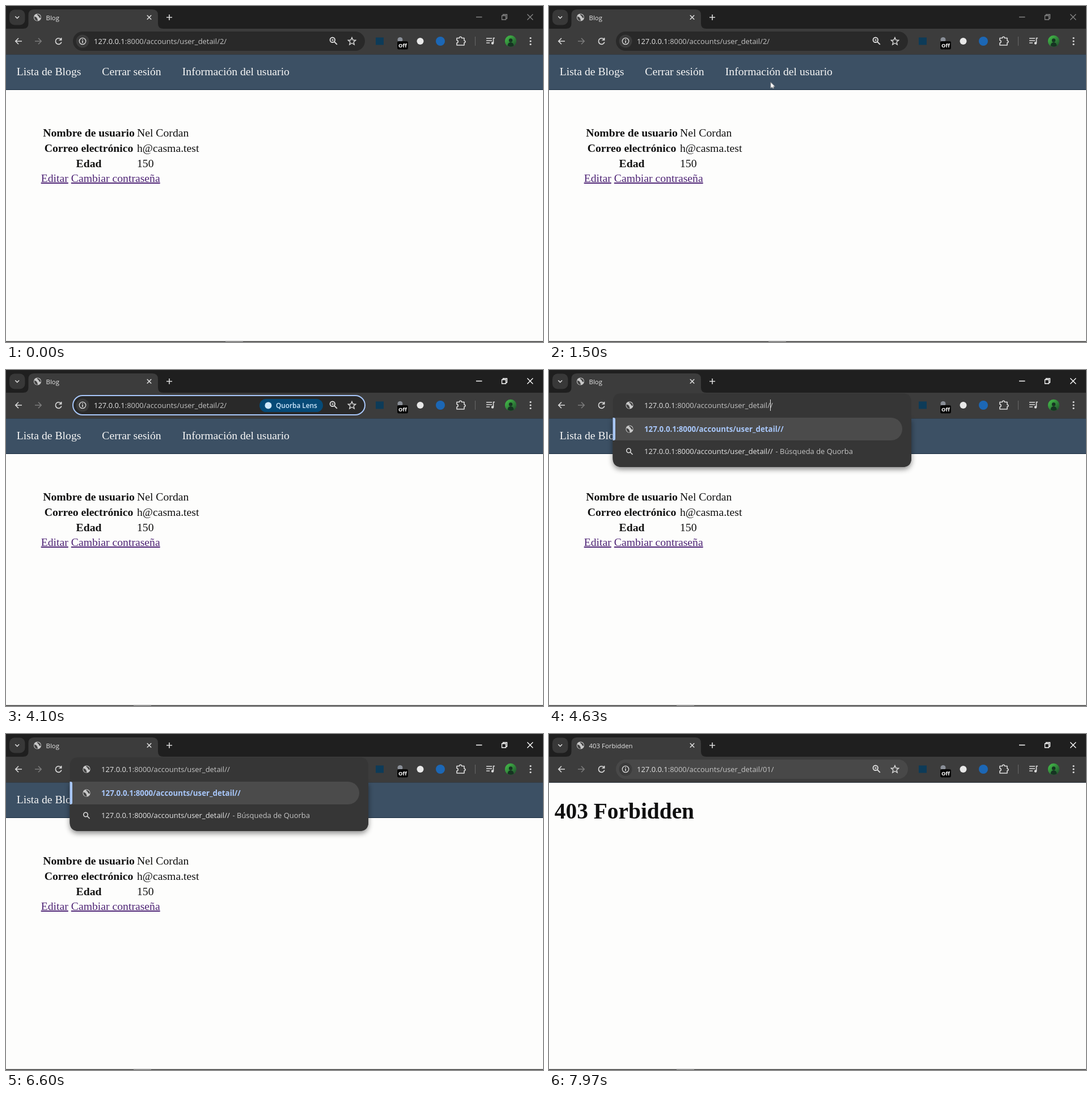
Write an HTML page that moves like this. It is 947x592 px and loops after 8000 ms.

```html
<!DOCTYPE html>
<html lang="es">
<head>
<meta charset="utf-8">
<title>Blog</title>
<style>
html, body { margin: 0; width: 100%; height: 100%; overflow: hidden; background: #fdfdfc; }
svg { display: block; width: 100%; height: 100%; }
text { font: 12.95px "Open Sans", "Noto Sans", sans-serif; fill: #e6e6e6; white-space: pre; }
.page text { font: 19.7px "Liberation Serif", "Times New Roman", serif; fill: #101010; }
.page .nav { fill: #f6f6f6; }
.page .th { font-weight: 700; text-anchor: middle; }
.page .link { fill: #4f2576; text-decoration: underline; }
.page .h1 { font-size: 39.4px; font-weight: 700; }
.tab { font-size: 11.4px; }
.chip { font-size: 11.8px; font-weight: 600; fill: #cfe9ff; }
.badge { font-size: 9.5px; font-weight: 700; fill: #fff; }
.path { fill: #c4c4c4; }
.match { font-size: 13.3px; font-weight: 700; fill: #a8c7fa; }
.line { fill: none; stroke: #dcdcdc; stroke-width: 1.6; }
.caret { stroke: #e6e6e6; stroke-width: 1; }

/* 8 s clock: every state switches in hard steps */
.win, .pill, .task, .early, .focus, .late, .popup, .q0, .q1, .q2, .blinkA, .blinkB, .blog, .denied {
  animation: 8s step-end infinite;
}
.win { animation-name: win; }
.pill { animation-name: pill; }
.task { animation-name: task; }
.early { animation-name: early; }
.focus { animation-name: focus; }
.late { animation-name: late; }
.popup { animation-name: popup; }
.q0 { animation-name: q0; }
.q1 { animation-name: q1; }
.q2 { animation-name: q2; }
.blinkA { animation-name: blinkA; }
.blinkB { animation-name: blinkB; }
.blog { animation-name: blog; }
.denied { animation-name: denied; }
.mouse { animation: mouse 8s linear infinite; }

@keyframes win { 0% { stroke: #858585; } 24.875%, 100% { stroke: #fff; } }
@keyframes pill { 0% { fill: #292929; } 88.125%, 100% { fill: #484848; } }
@keyframes task { 0% { transform: translateX(387px); } 24.875%, 100% { transform: translateX(225px); } }
@keyframes early { 0% { opacity: 1; } 56.25%, 100% { opacity: 0; } }
@keyframes focus { 0% { opacity: 0; } 24.875% { opacity: 1; } 56.25%, 100% { opacity: 0; } }
@keyframes late { 0% { opacity: 0; } 88.125%, 100% { opacity: 1; } }
@keyframes popup { 0% { opacity: 0; } 56.25% { opacity: 1; } 88.125%, 100% { opacity: 0; } }
@keyframes q0 { 0% { opacity: 1; } 83.75%, 100% { opacity: 0; } }
@keyframes q1 { 0% { opacity: 0; } 83.75% { opacity: 1; } 86%, 100% { opacity: 0; } }
@keyframes q2 { 0% { opacity: 0; } 86%, 100% { opacity: 1; } }
@keyframes blinkA {
  0% { opacity: 0; } 25.625% { opacity: 1; } 32.25% { opacity: 0; }
  38.875% { opacity: 1; } 45.5% { opacity: 0; } 52.125% { opacity: 1; } 56.25%, 100% { opacity: 0; }
}
@keyframes blinkB {
  0% { opacity: 0; } 56.25% { opacity: 1; } 62.875% { opacity: 0; }
  69.5% { opacity: 1; } 76.125% { opacity: 0; } 82.75%, 100% { opacity: 1; }
}
@keyframes blog { 0% { opacity: 1; } 91.25%, 100% { opacity: 0; } }
@keyframes denied { 0% { opacity: 0; } 91.25%, 100% { opacity: 1; } }
@keyframes mouse {
  0%, 10.8% { transform: translate(432px, 600px); }
  13.2%, 14% { transform: translate(413.5px, 275.5px); }
  18% { transform: translate(394px, 150px); opacity: 1; }
  21.2% { transform: translate(379px, 82px); opacity: 1; }
  21.3%, 100% { transform: translate(379px, 82px); opacity: 0; }
}
</style>
</head>
<body>
<svg viewBox="0 0 947 592" preserveAspectRatio="none">
  <defs>
    <g id="globe">
      <circle r="6.6" fill="#c8c8c8"/>
      <path d="M-5.5-1.5C-3-1-1 0-.5 2S1 4 0 6C-4 6-6 2-5.500-1.500ZM-1-5.500C0-3 2-3 2.500-1S5 1 5.800 1C6-3 3-5.500-1-5.500Z" fill="#424242"/>
    </g>
    <g id="glass" class="line">
      <circle cx="-1.500" cy="-1.500" r="3.700"/>
      <path d="M1.300 1.300 5.500 5.500"/>
    </g>
    <linearGradient id="photo" x2="1" y2="1">
      <stop offset=".2" stop-color="#3fae45"/>
      <stop offset="1" stop-color="#1d4a2a"/>
    </linearGradient>
    <filter id="soft" x="-10%" y="-20%" width="120%" height="150%">
      <feDropShadow dx="0" dy="4" stdDeviation="5" flood-opacity=".45"/>
    </filter>
  </defs>

  <!-- page -->
  <rect width="947" height="592" fill="#fdfdfc"/>
  <g class="page blog">
    <rect y="85" width="947" height="63" fill="#3c5064"/>
    <rect y="147" width="947" height="1" fill="#15293d"/>
    <text class="nav" x="18.700" y="122">Lista de Blogs</text>
    <text class="nav" x="169.300" y="122">Cerrar sesión</text>
    <text class="nav" x="310.800" y="122">Información del usuario</text>
    <text class="th" x="146" y="230">Nombre de usuario</text>
    <text x="231" y="230">Nel Cordan</text>
    <text class="th" x="146" y="257">Correo electrónico</text>
    <text x="231" y="257">h@casma.test</text>
    <text class="th" x="146" y="284">Edad</text>
    <text x="231" y="284">150</text>
    <text class="link" x="61.700" y="310">Editar</text>
    <text class="link" x="114.800" y="310">Cambiar contraseña</text>
  </g>
  <g class="page denied">
    <text class="h1" x="9.800" y="148.500">403 Forbidden</text>
  </g>

  <!-- tab strip -->
  <rect width="947" height="41" fill="#1f1f1f"/>
  <rect x="6" y="6.500" width="27.500" height="27" rx="9" fill="#383838"/>
  <path class="line" d="M16.300 18.300 19.700 21.700 23.100 18.300"/>
  <path d="M30 40Q39.500 40 39.500 31V16Q39.500 6 49.500 6H258Q268 6 268 16V31Q268 40 277.500 40Z" fill="#3c3c3c"/>
  <use href="#globe" x="55.500" y="20"/>
  <text class="tab blog" x="70.500" y="24.700">Blog</text>
  <text class="tab denied" x="70.500" y="24.700">403 Forbidden</text>
  <path class="line" d="M248.800 16.300 256.200 23.700M256.200 16.300 248.800 23.700M283 20H293M288 15V25"/>
  <g class="win" fill="none" stroke-width="1.300">
    <path d="M829 19.500H839.500M919.300 14.500 929.300 24.500M929.300 14.500 919.300 24.500"/>
    <path d="M874.500 17H881.500V24H874.500ZM876.500 17V15H883.500V22H881.500"/>
  </g>

  <!-- toolbar -->
  <rect y="40" width="947" height="45" fill="#3c3c3c"/>
  <rect y="85" width="947" height="1" fill="#333d46"/>
  <path class="line" d="M28 62H17M22 56.800 16.800 62 22 67.200"/>
  <path class="line" style="stroke:#7b7b7b" d="M51 62H62M57 56.800 62.200 62 57 67.200"/>
  <path class="line" d="M97 59A5.300 5.300 0 1 0 97.800 63.500M97.600 56V60H93.500"/>
  <rect class="pill" x="118" y="45" width="515" height="34" rx="17"/>
  <circle cx="135" cy="62" r="11.500" fill="#3b3b3b"/>
  <circle class="line" cx="135" cy="62" r="5.700" style="stroke-width:1.300"/>
  <path class="line" d="M135 61V65.300M135 58.600V60"/>
  <g class="early">
    <text x="155" y="66.700">127.0.0.1<tspan class="path">:8000/accounts/user_detail/2/</tspan></text>
  </g>
  <g class="late">
    <text x="155" y="66.700">127.0.0.1<tspan class="path">:8000/accounts/user_detail/01/</tspan></text>
  </g>
  <g class="focus">
    <rect x="118" y="45" width="515" height="34" rx="17" fill="none" stroke="#a8c7fa" stroke-width="2"/>
    <rect x="447" y="51" width="112" height="23" rx="11.500" fill="#064a77"/>
    <circle cx="462.500" cy="62.500" r="6" fill="#cfe9ff"/>
    <text class="chip" x="476" y="66.700">Quorba Lens</text>
  </g>
  <path class="caret blinkA" d="M377.500 51V71"/>
  <use href="#glass" transform="translate(577.500 61.500) scale(1.150)"/>
  <path class="line" style="stroke-width:1" d="M574 60H578M576 58V62"/>
  <path class="line" style="stroke-width:1.400" d="M610 55.500 611.900 60 616.600 60.300 613 63.400 614.200 68 610 65.500 605.800 68 607 63.400 603.400 60.300 608.100 60Z"/>

  <!-- extensions -->
  <rect x="652" y="55.500" width="14" height="13" fill="#0d3b58"/>
  <circle cx="695" cy="59.500" r="4.500" fill="#8a8f98"/>
  <rect x="690" y="62" width="19" height="14.500" rx="3" fill="#050505"/>
  <text class="badge" x="692" y="73">Off</text>
  <circle cx="730.500" cy="62" r="6" fill="#e8e8e8"/>
  <circle cx="766" cy="62" r="8" fill="#1c67b5"/>
  <path class="line" style="stroke-linejoin:round" d="M795 56.500H799.500Q799.500 54.300 801.500 54.300T803.500 56.500H808V61Q810 61 810 62.800T808 64.700V69H795V65Q797.200 64.800 797.200 62.700T795 60.500Z"/>
  <path d="M827.500 54V70" stroke="#696969"/>
  <path class="line" d="M847 57H857M847 61H857M847 65H853M859.500 65V56.500H862"/>
  <circle cx="858" cy="65.500" r="2.200" fill="#dcdcdc"/>
  <circle cx="890" cy="62" r="10.200" fill="url(#photo)"/>
  <path d="M884.500 70Q885 64 890 64T895.500 70A10 10 0 0 1 884.500 70Z" fill="#163322"/>
  <circle cx="890" cy="60.500" r="3.200" fill="#163322"/>
  <g fill="#dcdcdc">
    <circle cx="925" cy="56.500" r="1.600"/>
    <circle cx="925" cy="62" r="1.600"/>
    <circle cx="925" cy="67.500" r="1.600"/>
  </g>

  <!-- suggestions -->
  <g class="popup">
    <path d="M112.500 85H639V155Q639 171 623 171H128.500Q112.500 171 112.500 155Z" fill="#363636" filter="url(#soft)"/>
    <path d="M112.500 57Q112.500 41 128.500 41H623Q639 41 639 57V155Q639 171 623 171H128.500Q112.500 171 112.500 155Z" fill="#363636"/>
    <path d="M113 84H603A20 20 0 0 1 603 124H113Z" fill="#4b4b4b"/>
    <path d="M112.500 84H114Q117 84 117 87V121Q117 124 114 124H112.500Z" fill="#a8c7fa"/>
    <use href="#globe" x="142" y="62"/>
    <use href="#globe" x="142" y="104"/>
    <use href="#glass" x="142" y="143.500"/>
    <g class="q0">
      <text x="168" y="66.700">127.0.0.1<tspan class="path">:8000/accounts/user_detail//</tspan></text>
      <text class="match" x="168" y="108.700">127.0.0.1:8000/accounts/user_detail//</text>
      <text x="168" y="148.300">127.0.0.1:8000/accounts/user_detail//<tspan class="path" dx="1.500"> - Búsqueda de Quorba</tspan></text>
      <path class="caret blinkB" d="M390.500 52V72"/>
    </g>
    <g class="q1">
      <text x="168" y="66.700">127.0.0.1<tspan class="path">:8000/accounts/user_detail/0/</tspan></text>
      <text class="match" x="168" y="108.700">127.0.0.1:8000/accounts/user_detail/0/</text>
      <text x="168" y="148.300">127.0.0.1:8000/accounts/user_detail/0/<tspan class="path" dx="1.500"> - Búsqueda de Quorba</tspan></text>
      <path class="caret" d="M398 52V72"/>
    </g>
    <g class="q2">
      <text x="168" y="66.700">127.0.0.1<tspan class="path">:8000/accounts/user_detail/01/</tspan></text>
      <text class="match" x="168" y="108.700">127.0.0.1:8000/accounts/user_detail/01/</text>
      <text x="168" y="148.300">127.0.0.1:8000/accounts/user_detail/01/<tspan class="path" dx="1.500"> - Búsqueda de Quorba</tspan></text>
      <path class="caret" d="M405.500 52V72"/>
    </g>
  </g>

  <!-- taskbar edge and pointer -->
  <rect y="590.500" width="947" height="1.500" fill="#3a3a3a"/>
  <rect class="task" y="590.500" width="31" height="1.500" fill="#8c8c8c"/>
  <path class="mouse" d="M.5.500V11L3 8.800 4.500 11.500 6 10.800 5 8H8Z" fill="#fff" stroke="#8f8f8f" stroke-width=".9"/>
</svg>
</body>
</html>
```
